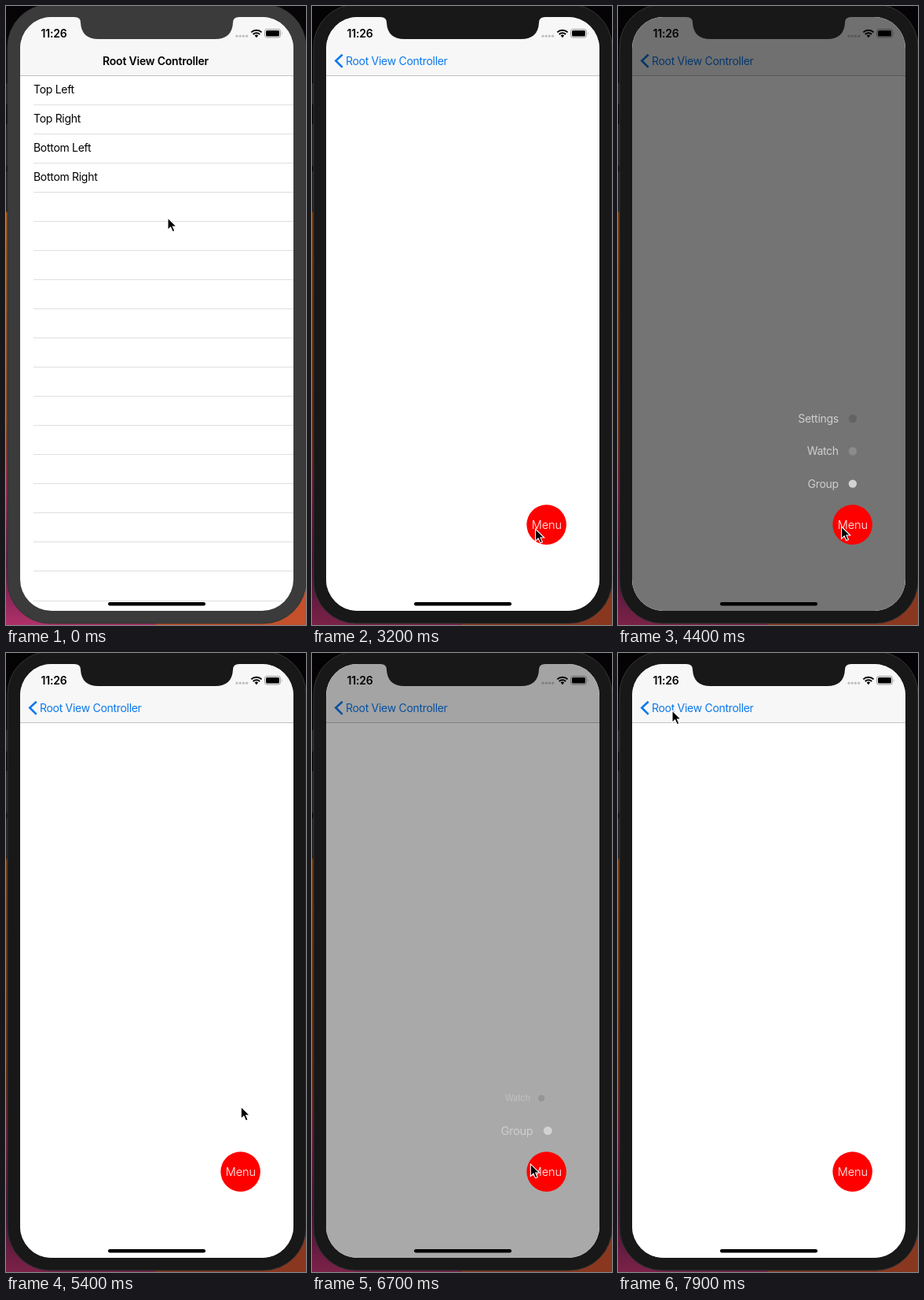
Write an HTML page that moves like this. It is 382 by 786 pixels and loops after 8 s.

```html
<!DOCTYPE html>
<html>
<head>
<meta charset="utf-8">
<style>
html, body { margin: 0; height: 100%; overflow: hidden; background: #000; }
svg { display: block; width: 382px; height: 786px; }
text { font: 14px Inter, Roboto, sans-serif; letter-spacing: -.3px; }
.bold { font-weight: 600; letter-spacing: -.2px; }
.blue { fill: #0a78ee; }
</style>
</head>
<body>
<svg viewBox="0 0 382 786">
  <defs>
    <linearGradient id="wall" x2="0" y2="1">
      <stop offset="0" stop-color="#060406"/>
      <stop offset=".325" stop-color="#140a0c"/>
      <stop offset=".335" stop-color="#a85a18"/>
      <stop offset=".68" stop-color="#8e451c"/>
      <stop offset=".78" stop-color="#a02a52"/>
      <stop offset=".9" stop-color="#5e1c48"/>
      <stop offset="1" stop-color="#b03068"/>
    </linearGradient>
    <linearGradient id="edge">
      <stop offset="0" stop-opacity="0"/>
      <stop offset="1" stop-opacity=".17"/>
    </linearGradient>
    <clipPath id="screen"><rect x="18" y="14" width="348" height="754" rx="40"/></clipPath>
  </defs>

  <rect width="382" height="786" fill="url(#wall)"/>
  <rect x="191" width="191" height="600" fill="#080508"/>
  <rect x="191" y="600" width="191" height="186" fill="#c4502c"/>
  <rect id="shade" width="382" height="786" opacity="0"/>
  <path d="M0 98h3v27h-3zM0 150h3v53h-3zM0 210h3v51h-3z" fill="#222"/>
  <rect id="bezel" x="2" y="-2" width="380" height="786" rx="54" stroke="#333"/>

  <g clip-path="url(#screen)">
    <rect x="18" y="14" width="348" height="754" fill="#fff"/>
    <g id="list">
      <rect id="picked" x="18" y="199" width="348" height="37" fill="#d0d0d0"/>
    </g>
    <rect id="under" x="18" y="88" width="348" height="680" opacity="0"/>
    <g id="detail">
      <rect x="9" y="88" width="9" height="680" fill="url(#edge)"/>
      <rect x="18" y="88" width="348" height="680" fill="#fff"/>
    </g>

    <rect x="18" y="14" width="348" height="74" fill="#f7f7f7"/>
    <path d="M18 88.5h348" stroke="#c2c2c2"/>
    <text id="title" class="bold" y="75">Root View Controller</text>
    <text id="back" class="blue" y="75">Root View Controller</text>
    <path id="chevron" d="M38.7 61.8L30.3 69.5L38.7 77.8" fill="none" stroke="#0a78ee" stroke-width="2.6"/>

    <text class="bold" x="44.5" y="40">11:26</text>
    <g fill="#bfbfbf">
      <circle cx="294" cy="38.2" r="1.6"/><circle cx="298.2" cy="38.2" r="1.6"/>
      <circle cx="302.4" cy="38.2" r="1.6"/><circle cx="306.6" cy="38.2" r="1.6"/>
    </g>
    <g fill="none" stroke="#000" stroke-width="2">
      <path d="M312.3 33.4a9.3 9.3 0 0 1 13.2 0M314.7 36a6 6 0 0 1 8.4 0"/>
      <path d="M316.6 37.6a3.4 3.4 0 0 1 4.6 0l-2.3 2.6z" fill="#000" stroke="none"/>
    </g>
    <rect x="329.5" y="29.5" width="20" height="10.5" rx="2.8" fill="none" stroke="#999"/>
    <rect x="331" y="31" width="17" height="7.5" rx="1.6"/>
    <path d="M351 33q1.4 1.7 0 3.6z" fill="#999"/>

    <rect id="dim" x="18" y="14" width="348" height="754" opacity="0"/>
    <g id="items"></g>
    <g id="button">
      <circle cx="298.6" cy="658.6" r="25.3" fill="#f00"/>
      <text x="298.8" y="664" text-anchor="middle" fill="#fff" style="font-size:14.5px;font-weight:300;letter-spacing:-.1px">Menu</text>
    </g>
    <rect x="130" y="757" width="124" height="4.4" rx="2.2"/>
  </g>
  <path id="notch" d="M87 13v1q8 0 8 7q1 21 23 21h148q22 0 23-21q0-7 8-7v-1z"/>
  <path id="cursor" d="M0 0V15.4L3.6 12L6.2 17.8L8.9 16.6L6.4 11H11.2Z" stroke="#fff" stroke-width="1.1"/>
</svg>
<script>
const LOOP = 8000, PUSH = 1734;
const $ = id => document.getElementById(id);
const set = (el, attrs) => { for (const k in attrs) el.setAttribute(k, attrs[k]); };
function add(parent, tag, attrs, text = '') {
  const el = document.createElementNS('http://www.w3.org/2000/svg', tag);
  set(el, attrs);
  el.textContent = text;
  return parent.appendChild(el);
}
const clamp = x => Math.min(1, Math.max(0, x));
const ease = x => (x = clamp(x), x * x * (3 - 2 * x));
const spring = s => s <= 0 ? 0 : 1 - Math.exp(-18 * s) * (Math.cos(27 * s) + Math.sin(27 * s) * 18 / 27);

['Top Left', 'Top Right', 'Bottom Left', 'Bottom Right'].forEach((name, i) =>
  add($('list'), 'text', { x: 35, y: 111.3 + 37 * i }, name));
for (let i = 1; i < 19; i++)
  add($('list'), 'path', { d: `M35 ${Math.round(87.6 + 37.05 * i) + .5}H366`, stroke: '#dfdfe1' });

// Listed from the top down; they open bottom first and close top first.
const items = [['Settings', 524, '#636363'], ['Watch', 565.3, '#8b8b8b'], ['Group', 606.6, '#d2d2d2']]
  .map(([name, y, color]) => {
    const el = add($('items'), 'g', {});
    add(el, 'text', { x: 280.8, y: 5, 'text-anchor': 'end', fill: '#cecece' }, name);
    add(el, 'circle', { cx: 298.8, cy: 0, r: 5.2, fill: color });
    return { el, y };
  });

const menus = [[3230, 4750], [6550, 7250]]; // opening and closing times

const path = [ // time, x, y
  [0, 206, 269], [50, 206, 269], [200, 145, 232], [400, 142, 230], [600, 128, 222],
  [1000, 128, 222], [1200, 127, 221], [1850, 127, 221], [2500, 215, 470], [2650, 215, 470],
  [3200, 284.5, 664], [3700, 284.5, 664], [4100, 284.5, 661], [4400, 284.5, 661],
  [4600, 297, 536], [5000, 297, 536], [5600, 300, 590], [5700, 300, 590], [6450, 279.5, 661],
  [6650, 279.5, 661], [7100, 246, 323], [7350, 246, 323], [7850, 69, 73], [8000, 69, 73]];

function cursorAt(t) {
  const i = path.findIndex(k => k[0] > t);
  const [t0, x0, y0] = path[i - 1], [t1, x1, y1] = path[i];
  const k = ease((t - t0) / (t1 - t0));
  return `translate(${x0 + (x1 - x0) * k} ${y0 + (y1 - y0) * k})`;
}

function draw(t) {
  const active = t >= 1400, body = active ? '#181818' : '#3b3b3b';
  set($('bezel'), { fill: body });
  set($('notch'), { fill: body });
  set($('shade'), { opacity: active ? .3 : 0 });

  const w = Math.max(0, t - PUSH) * .0186;
  const p = t > PUSH + 700 ? 1 : 1 - (1 + w) * Math.exp(-w);
  const slide = 348 * (1 - p), drift = Math.pow(p, 1.23);
  set($('picked'), { opacity: p > 0 ? 1 : 0 });
  set($('list'), { transform: `translate(${-104 * p})` });
  set($('under'), { opacity: .11 * Math.min(1, p * 1.1) });
  set($('detail'), { transform: `translate(${slide})`, opacity: p > 0 ? 1 : 0 });
  set($('button'), { transform: `translate(${slide})` });
  set($('title'), { x: 123 - 80 * drift, opacity: Math.pow(1 - p, .6) });
  set($('back'), { x: 123 - 80 * drift, opacity: p * p });
  set($('chevron'), { opacity: p });

  const menu = menus.find(m => t >= m[0] && t < m[1] + 700);
  const [open, close] = menu || [LOOP, LOOP];
  set($('dim'), { opacity: .545 * (ease((t - open) / 260) - ease((t - close) / 300)) });
  items.forEach(({ el, y }, i) => {
    const grow = spring((t - open - 100 * (2 - i)) / 1000);
    const k = grow * (1 - ease((t - close - 100 * i) / 150));
    const s = .4 + .6 * k;
    set(el, { transform: `translate(${266 * (1 - s)} ${y}) scale(${s})`, opacity: clamp(k) });
  });

  set($('cursor'), { transform: cursorAt(t) });
}

function tick(now) {
  draw(now % LOOP);
  requestAnimationFrame(tick);
}
draw(0);
requestAnimationFrame(tick);
</script>
</body>
</html>
```
